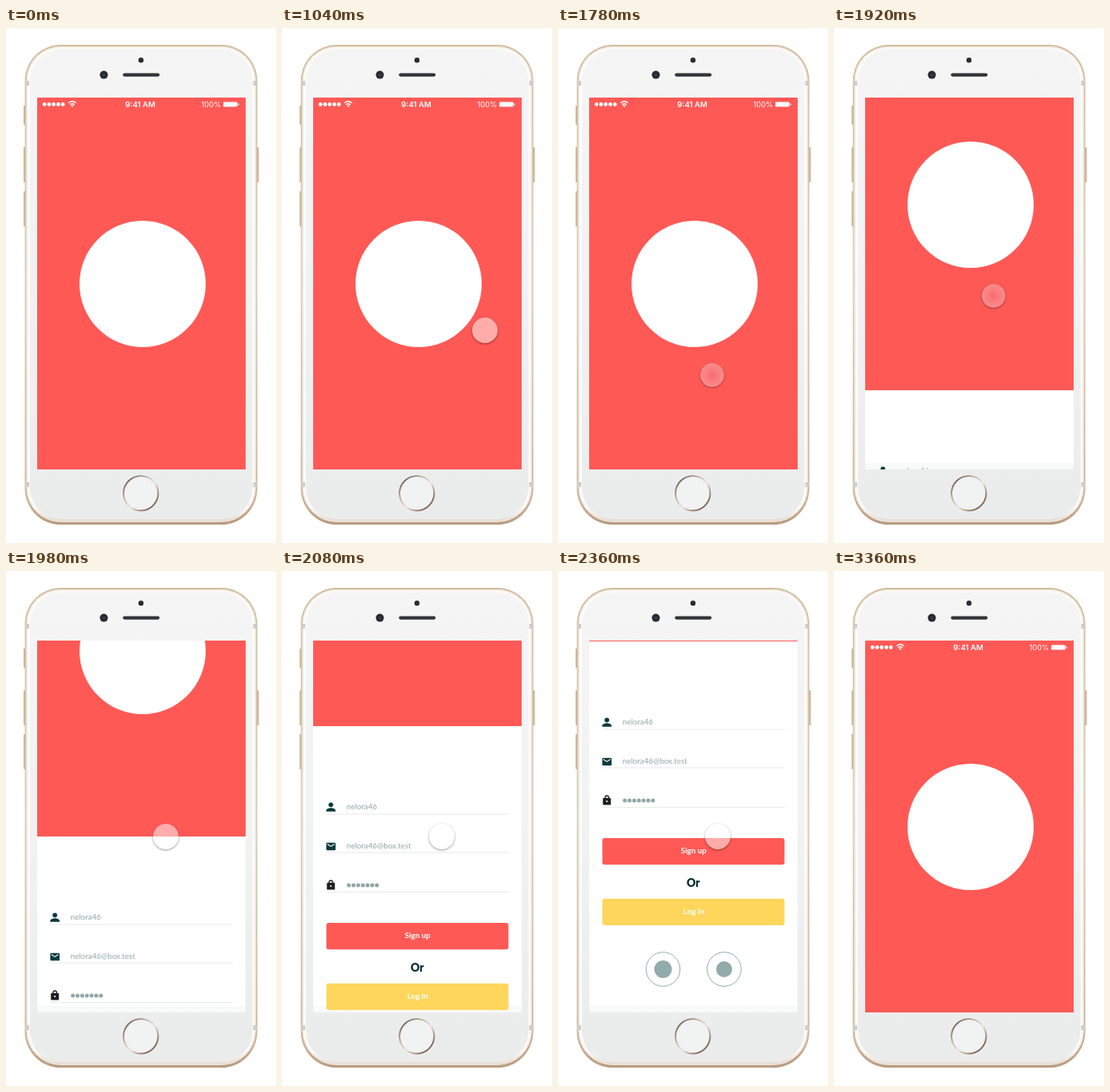
An HTML page for the animation above (3.58 s loop, 338 px wide and 644 px high).

```html
<!DOCTYPE html>
<html lang="en">
<head>
<meta charset="utf-8">
<title>Sign-up swipe</title>
<style>
  html, body { margin: 0; width: 100%; height: 100%; overflow: hidden; background: #fff; }
  svg { position: absolute; left: 0; top: 0; display: block; }
  .status { font-family: Inter, "Liberation Sans", sans-serif; fill: #fff; }
  .form { font-family: Lato, "Open Sans", sans-serif; font-size: 9.8px; }
  .field { fill: #92a6a8; }
  .label { fill: #fff; font-weight: 700; text-anchor: middle; }
  #touch {
    position: absolute; left: -16px; top: -16px; width: 32px; height: 32px;
    border-radius: 50%; background: rgba(255, 255, 255, .5);
    box-shadow: 0 1px 3px rgba(0, 0, 0, .42); visibility: hidden;
  }
  #press {
    position: absolute; inset: 0; border-radius: 50%; opacity: 0;
    background: radial-gradient(circle, rgba(245, 80, 84, .7) 0, rgba(245, 88, 90, .55) 36%, rgba(232, 92, 94, .4) 70%);
  }
</style>
</head>
<body>
<svg width="338" height="644" viewBox="0 0 338 644">
  <defs>
    <linearGradient id="rim" x2="0" y2="1">
      <stop offset="0" stop-color="#d3bc9c"/>
      <stop offset=".5" stop-color="#dccab4"/>
      <stop offset=".95" stop-color="#cdb196"/>
      <stop offset="1" stop-color="#b89a80"/>
    </linearGradient>
    <linearGradient id="gloss" x2="0" y2="1">
      <stop offset="0" stop-color="#fbf9f6"/>
      <stop offset=".1" stop-color="#fdfdfd"/>
      <stop offset=".97" stop-color="#fbfaf9"/>
      <stop offset="1" stop-color="#e6dad0"/>
    </linearGradient>
    <linearGradient id="face" x2="0" y2="1">
      <stop offset="0" stop-color="#f5f5f5"/>
      <stop offset=".5" stop-color="#f1f2f2"/>
      <stop offset="1" stop-color="#eaecec"/>
    </linearGradient>
    <linearGradient id="ring" x2="1" y2="1">
      <stop offset="0" stop-color="#4f3c33"/>
      <stop offset=".35" stop-color="#c9b3a3"/>
      <stop offset=".55" stop-color="#efe4da"/>
      <stop offset=".8" stop-color="#8c7060"/>
      <stop offset="1" stop-color="#57443a"/>
    </linearGradient>
    <clipPath id="screen"><rect x="39" y="87" width="261" height="465"/></clipPath>
  </defs>

  <!-- phone -->
  <g fill="#cdb699">
    <rect x="22" y="97" width="3" height="24" rx="1"/>
    <rect x="22" y="149" width="3" height="44" rx="1"/>
    <rect x="22" y="204" width="3" height="44" rx="1"/>
    <rect x="313.5" y="149" width="3" height="44" rx="1"/>
  </g>
  <rect x="23.600" y="21.100" width="291" height="600" rx="45" fill="url(#rim)"/>
  <rect x="25.500" y="22.900" width="287.200" height="595" rx="43" fill="url(#gloss)"/>
  <rect x="26.300" y="23.700" width="285.600" height="593.400" rx="42" fill="none" stroke="#ede5dc"/>
  <rect x="30" y="27" width="278.500" height="587" rx="39" fill="url(#face)"/>
  <path d="M24 69h5M309.500 69h5M24 571h5M309.500 571h5" stroke="#d2ccc5" stroke-width="6"/>
  <circle cx="169" cy="40.300" r="3.200" fill="#292b31"/>
  <circle cx="122.500" cy="58.600" r="5" fill="#272a32"/>
  <circle cx="122.500" cy="58.600" r="1.800" fill="#353c4a"/>
  <rect x="146.300" y="56.500" width="46" height="4.200" rx="2.100" fill="#34353a"/>
  <circle cx="168.800" cy="581.800" r="21.700" fill="#f1f2f2" stroke="url(#ring)" stroke-width="1.900"/>

  <g clip-path="url(#screen)">
    <rect x="39" y="87" width="261" height="465" fill="#f8f9f9"/>
    <rect x="39" y="87" width="261" height="457" fill="#fff"/>
    <g id="page">
      <!-- splash -->
      <rect x="39" y="87" width="261" height="465" fill="#ff5956"/>
      <circle cx="171" cy="320" r="79" fill="#fff"/>
      <g class="status">
        <g id="signal"></g>
        <g fill="none" stroke="#fff" stroke-width="1.300">
          <path d="M78.300 93.700q4.700-3.900 9.400 0M80.100 95.900q2.900-2.300 5.800 0"/>
        </g>
        <path d="M81.300 97.200q1.700-1.200 3.400 0l-1.700 1.800z"/>
        <text x="168" y="99" font-size="9.600" font-weight="600" text-anchor="middle">9:41 AM</text>
        <text x="244.500" y="99" font-size="9.300">100%</text>
        <rect x="272" y="92.500" width="17.600" height="6" rx="1.200"/>
        <rect x="290.400" y="94.200" width="1.200" height="2.600" rx=".5"/>
      </g>

      <!-- form -->
      <g class="form" transform="translate(0 464)">
        <path d="M55.500 198h228.500M55.500 246h228.500M55.500 295.500h228.500" stroke="#e8eaea"/>
        <g fill="#0b3a40">
          <circle cx="61.200" cy="186.300" r="2.900"/>
          <path d="M55.400 194.800v-1.500c0-2 3.900-3 5.800-3s5.800 1 5.800 3v1.500z"/>
          <rect x="55.400" y="233.800" width="11.700" height="9.400" rx="1.200"/>
        </g>
        <path d="M56.800 235.600l4.400 2.800 4.400-2.800" fill="none" stroke="#fff" stroke-width="1.200"/>
        <rect x="56.200" y="283.800" width="10" height="8.800" rx="1.200" fill="#1d2023"/>
        <path d="M58.900 284.500v-1.200a2.300 2.300 0 0 1 4.600 0v1.200" fill="none" stroke="#1d2023" stroke-width="1.300"/>
        <circle cx="61.200" cy="288" r="1.100" fill="#fff"/>
        <g class="field">
          <text x="80.800" y="192">nelora46</text>
          <text x="80.800" y="241">nelora46@box.test</text>
          <g id="secret"></g>
        </g>
        <rect x="55.500" y="334" width="228" height="33.300" rx="3" fill="#ff5956"/>
        <text class="label" x="169.800" y="353.300">Sign up</text>
        <text x="169.300" y="394.500" font-size="14" font-weight="900" text-anchor="middle" fill="#0b2f38">Or</text>
        <rect x="55.500" y="409.800" width="228" height="33.300" rx="3" fill="#ffd65c"/>
        <text class="label" x="169.800" y="429.300">Log in</text>
        <g fill="none" stroke="#92abab">
          <circle cx="131.500" cy="498" r="21.300"/>
          <circle cx="208" cy="498" r="21.300"/>
        </g>
        <g fill="#92abab">
          <circle cx="131.500" cy="498" r="11"/>
          <circle cx="208" cy="498" r="10"/>
        </g>
      </g>
    </g>
  </g>
</svg>
<div id="touch"><div id="press"></div></div>

<script>
  const LOOP = 3580, SHOW = 1040, HIDE = 3360, STEP = 20;
  const GRAB = 1780, RELEASE = 1922, SETTLE = 2393;
  const DRAG = 102, PAGE = 464;
  const $ = id => document.getElementById(id);
  const [page, touch, press] = ['page', 'touch', 'press'].map($);

  const dots = (id, n, x, y, gap, r) => {
    $(id).innerHTML = Array.from({ length: n }, (_, i) =>
      `<circle cx="${x + i * gap}" cy="${y}" r="${r}"/>`).join('');
  };
  dots('signal', 5, 48.2, 95.5, 5.75, 2.4);
  dots('secret', 7, 83.7, 287, 5.85, 2.5);

  const part = (t, a, b) => Math.min(1, Math.max(0, (t - a) / (b - a)));
  const mix = (a, b, u) => a + (b - a) * u;
  const smooth = u => u * u * (3 - 2 * u);
  const flick = u => u * u;

  // time, x, y, easing towards this point
  const path = [
    [SHOW, 254, 378],
    [1680, 192, 435, smooth],
    [GRAB, 193, 434, smooth],
    [RELEASE, 200, 332, flick]
  ];

  function finger(t) {
    let [, x, y] = path[0];
    for (let i = 1; i < path.length; i++) {
      const [end, px, py, ease] = path[i];
      const u = ease(part(t, path[i - 1][0], end));
      x = mix(x, px, u);
      y = mix(y, py, u);
    }
    return [x, y];
  }

  function scroll(t) {
    if (t >= HIDE) return 0;
    if (t < RELEASE) return DRAG * flick(part(t, GRAB, RELEASE));
    return PAGE - (PAGE - DRAG) * (1 - part(t, RELEASE, SETTLE)) ** 3;
  }

  function draw(t) {
    const [x, y] = finger(t);
    const down = smooth(part(t, 1660, 1760)) * (1 - part(t, RELEASE, 1980));
    page.setAttribute('transform', `translate(0 ${-Math.round(scroll(t))})`);
    touch.style.visibility = t >= SHOW && t < HIDE ? 'visible' : 'hidden';
    touch.style.transform = `translate(${x}px, ${y}px) scale(${1 - .08 * down})`;
    press.style.opacity = down;
  }

  const start = performance.now();
  function tick() {
    const t = (performance.now() - start) % LOOP;
    draw(Math.floor(t / STEP) * STEP);
    requestAnimationFrame(tick);
  }
  tick();
</script>
</body>
</html>
```
